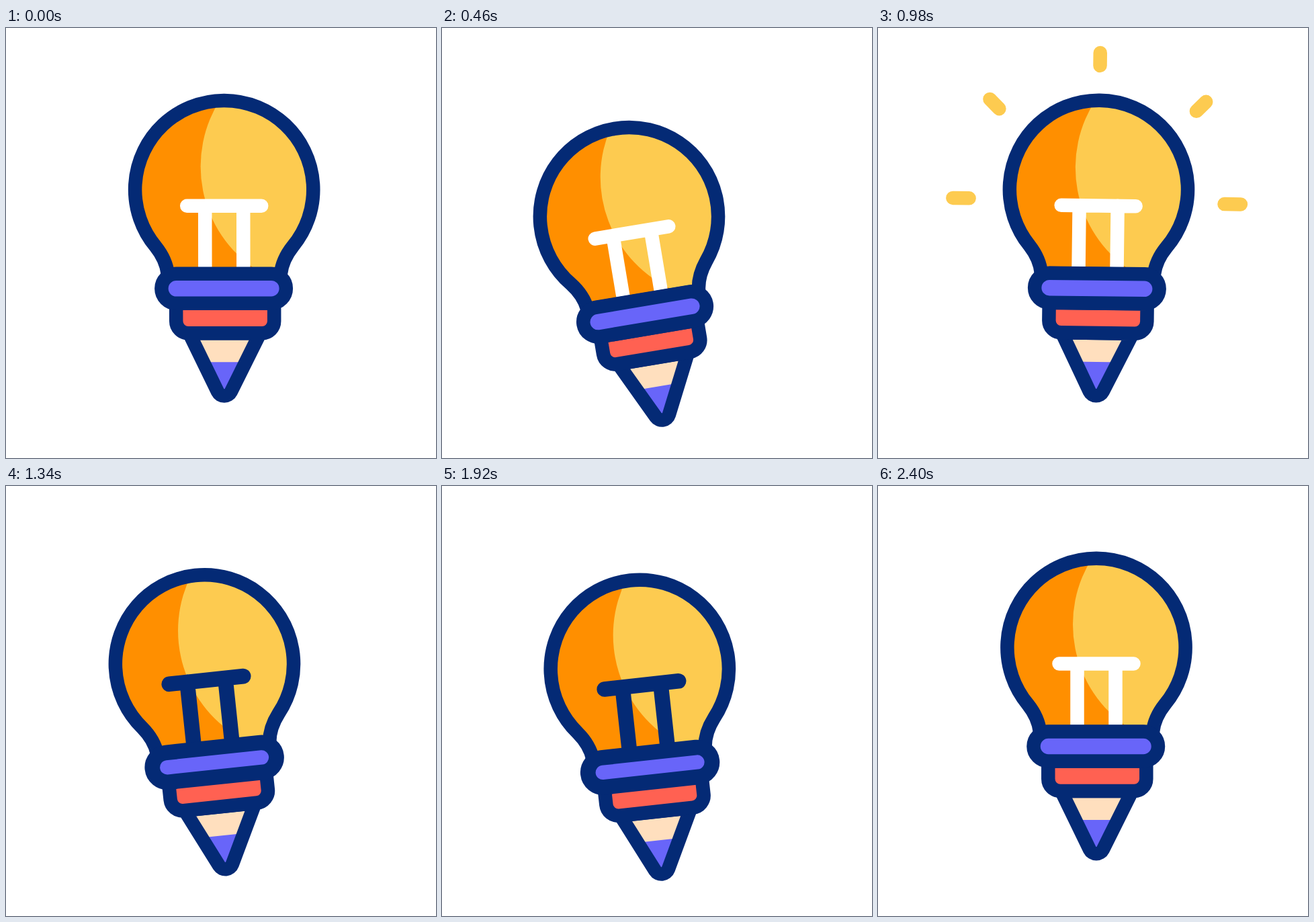
Write an HTML page that moves like this. It is 640x640 px and loops after 2420 ms.

```html
<!DOCTYPE html>
<html lang="en">
<head>
<meta charset="utf-8">
<title>Bulb pencil</title>
<style>
  html, body { margin: 0; width: 100%; height: 100%; overflow: hidden; background: #fff; }
  svg { display: block; width: 100vw; height: 100vh; }
  .outline { stroke: #042a75; }
</style>
</head>
<body>
<svg viewBox="0 0 640 640" fill="none" stroke-width="20.5" stroke-linecap="round" stroke-linejoin="round">
  <defs>
    <path id="glass" d="M241 366C239 348 231 335 223 325A132.6 132.6 0 1 1 427 325C419 335 411 348 409 366Z"/>
    <path id="cone" d="M272.7 454L315.1 541.2a11 11 0 0 0 19.7 0L378.3 454Z"/>
    <clipPath id="inGlass"><use href="#glass"/></clipPath>
    <clipPath id="inCone"><use href="#cone"/></clipPath>
  </defs>
  <g id="bulb">
    <g id="rays" stroke="#fdcb50"></g>
    <use href="#glass" fill="#ff8f00"/>
    <circle cx="474" cy="206" r="184" fill="#fdcb50" clip-path="url(#inGlass)"/>
    <path id="filament" d="M269.5 264.5H380.5M296.5 264.5V362M353.5 264.5V362"/>
    <use href="#glass" class="outline"/>
    <use href="#cone" fill="#ffdfbe"/>
    <path d="M260 497h130v70h-130z" fill="#6865f9" clip-path="url(#inCone)"/>
    <use href="#cone" class="outline"/>
    <path class="outline" fill="#ff6152" d="M253.3 409.5V436a18 18 0 0 0 18 18H381.3a18 18 0 0 0 18-18V409.5Z"/>
    <rect id="collar" class="outline" fill="#6865f9" x="231.5" y="365.5" width="185.5" height="44" rx="22"/>
  </g>
</svg>
<script>
const LOOP = 2420, CYCLE = 1200;
const [bulb, rays, filament, collar] =
  ['bulb', 'rays', 'filament', 'collar'].map(id => document.getElementById(id));

// inner end, then outer end
const rayEnds = [
  [132.3, 255.7, 79.3, 255.5],
  [175.5, 122, 144.5, 91],
  [324.8, 56, 324.8, 14.3],
  [469, 122, 500, 91],
  [512.3, 259.8, 565.8, 259.9]
];
const rayLines = rayEnds.map(() =>
  rays.appendChild(document.createElementNS('http://www.w3.org/2000/svg', 'line')));

const progress = (t, from, to) => Math.min(1, Math.max(0, (t - from) / (to - from)));
const smooth = u => u * u * (3 - 2 * u);
const mix = (a, b, u) => a + (b - a) * u;
const easeOut = (u, power) => 1 - (1 - u) ** power;

function pose(t) {
  const lean = 1 - Math.exp(-Math.min(t, 650) / 153);
  const swing = smooth(progress(t, 650, 900));
  const settle = easeOut(progress(t, 900, 1000), 1.5);
  return {
    angle: mix(mix(-10 * lean, 8.5, swing), 0, settle),
    drop: mix(38.3 * lean, 0, swing)
  };
}

function drawRays(t) {
  rays.style.display = t >= 900 && t < CYCLE ? '' : 'none';
  const head = easeOut(progress(t, 900, 1110), 1.25);
  const tail = easeOut(progress(t, 1000, CYCLE), 1.25);
  rayLines.forEach((line, i) => {
    const [x1, y1, x2, y2] = rayEnds[i];
    line.setAttribute('x1', mix(x1, x2, tail));
    line.setAttribute('y1', mix(y1, y2, tail));
    line.setAttribute('x2', mix(x1, x2, head));
    line.setAttribute('y2', mix(y1, y2, head));
  });
}

function draw(now) {
  const time = now % LOOP;
  const t = time < 2 * CYCLE ? time % CYCLE : 0;
  const dark = time >= CYCLE && time < 2 * CYCLE;
  const { angle, drop } = pose(t);
  bulb.setAttribute('transform', `translate(0 ${drop}) rotate(${angle} 325 522)`);
  filament.setAttribute('stroke', dark ? '#042a75' : '#fff');
  for (const part of [filament, collar]) part.setAttribute('stroke-width', dark ? 22.7 : 20.5);
  drawRays(t);
}

const start = performance.now();
function tick() {
  draw(performance.now() - start);
  requestAnimationFrame(tick);
}
tick();
</script>
</body>
</html>
```
